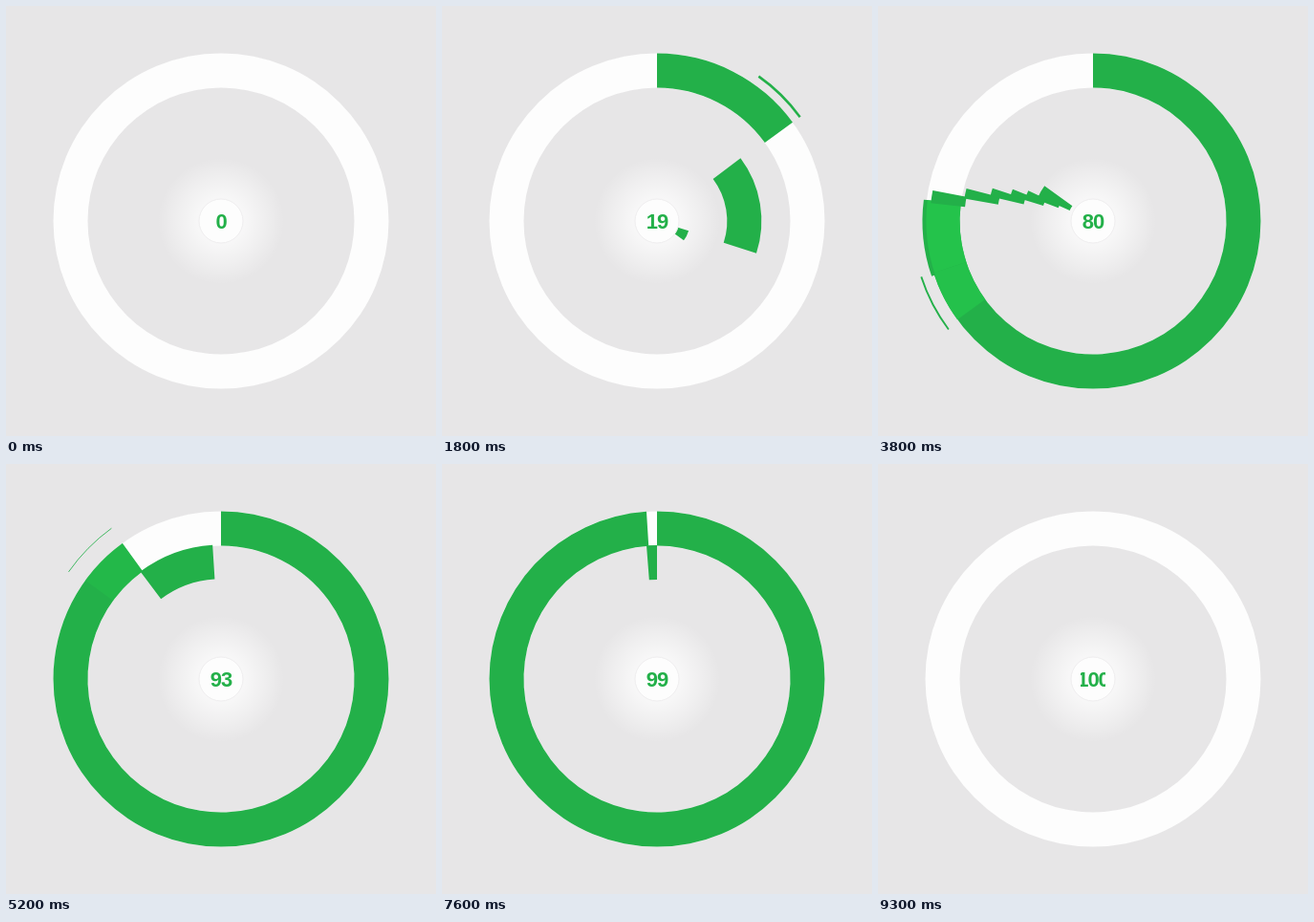
These frames come from a looping animation (450x450 px, 9.4 s). An HTML page with a canvas:

```html
<!DOCTYPE html>
<html lang="en">
<head>
<meta charset="utf-8">
<title>Radial progress</title>
<style>
  html, body { margin: 0; width: 100%; height: 100%; overflow: hidden; background: #e7e6e7; }
  canvas { display: block; width: 450px; height: 450px; }
</style>
</head>
<body>
<canvas id="stage" width="450" height="450"></canvas>
<script>
const ctx = document.getElementById('stage').getContext('2d');
const LOOP = 9400, STEP = 100;
const FLIGHT = 1000, RIPPLE = 600, FINALE = 1300;
const C = 225, OUTER = 175.5, THICK = 36, HUB = 23, START = 16;
const OVERLAP = 0.25, FLASH_FROM = 65;
const GREEN = '#23b049', LIGHT = '#24c34b', WHITE = '#fdfdfd';

// Progress arrives in bursts: each piece spans two neighbouring stops,
// and the gap between launches shrinks by a constant ratio.
function burst(launch, stops, gap = 0, ratio = 1) {
  return stops.slice(1).map((to, i) => {
    const piece = { from: stops[i], to, launch, land: launch + FLIGHT };
    launch += gap;
    gap *= ratio;
    return piece;
  });
}

const pieces = [
  ...burst(75, [0, 10, 15, 30, 35], 500, 0.92),
  ...burst(1620, [35, 65]),
  ...burst(2476, [65, 70, 77], 310),
  ...burst(2815, [77, 78, 79, 80, 81, 82, 85], 115, 0.87),
  ...burst(3726, [85, 90, 99], 590),
  ...burst(6718, [99, 100])
];
const finish = pieces[pieces.length - 1].land;

const clamp = x => Math.max(0, Math.min(1, x));
const angle = percent => (percent / 100 - 0.25) * Math.PI * 2;
const travel = (piece, t) => clamp((t - piece.launch) / FLIGHT) ** 2;

// Landed pieces count in full, flying ones in part.
function countAt(t) {
  const total = pieces.reduce((sum, p) => {
    const size = p.to - p.from;
    return sum + (t >= p.land ? size : 0.92 * size ** 0.7 * travel(p, t));
  }, 0);
  return Math.floor(total);
}

function band(from, to, outer, color) {
  ctx.fillStyle = color;
  ctx.beginPath();
  ctx.arc(C, C, outer, angle(from), angle(to));
  ctx.arc(C, C, Math.max(0, outer - THICK), angle(to), angle(from), true);
  ctx.fill();
}

function line(from, to, radius, width) {
  ctx.strokeStyle = GREEN;
  ctx.lineWidth = width;
  ctx.beginPath();
  ctx.arc(C, C, radius, angle(from), angle(to));
  ctx.stroke();
}

function drawBackground() {
  ctx.fillStyle = '#e7e6e7';
  ctx.fillRect(0, 0, 450, 450);
  const glow = ctx.createRadialGradient(C, C, HUB, C, C, 66);
  glow.addColorStop(0, 'rgba(255,255,255,.7)');
  glow.addColorStop(0.5, 'rgba(255,255,255,.37)');
  glow.addColorStop(1, 'rgba(255,255,255,0)');
  ctx.fillStyle = glow;
  ctx.fillRect(C - 66, C - 66, 132, 132);
  band(0, 100, OUTER, WHITE);
}

function drawPieces(t) {
  const filled = Math.max(0, ...pieces.filter(p => t >= p.land).map(p => p.to));
  if (filled) {
    ctx.globalAlpha = 1 - clamp((t - 8900) / 300);
    band(0, filled, OUTER, GREEN);
    ctx.globalAlpha = 1;
  }
  for (const piece of pieces) {
    const { from, to, launch, land } = piece;
    if (t < launch) continue;
    if (t < land) {
      band(from - OVERLAP, to, START + (OUTER - START) * travel(piece, t), GREEN);
      continue;
    }
    const p = (t - land) / RIPPLE;
    if (p >= 1 || to === 100) continue;
    if (from >= FLASH_FROM) {
      ctx.globalAlpha = Math.min(1, 2 - 2 * p);
      band(from, to, OUTER, LIGHT);
      ctx.globalAlpha = 1;
    }
    line(from - OVERLAP, to, 176 + 24 * p, 4 * (1 - p));
  }
}

function drawFinale(t) {
  const p = (t - finish) / FINALE;
  if (p < 0 || p >= 1) return;
  const e = 1 - 2 ** (-10 * p);
  ctx.globalAlpha = clamp((1 - p) / 0.4);
  line(0, 100, 176 + 45.6 * e, 4 - 3.1 * e);
  ctx.globalAlpha = 1;
}

function drawHub(t) {
  ctx.fillStyle = WHITE;
  ctx.strokeStyle = '#efeeef';
  ctx.lineWidth = 1;
  ctx.beginPath();
  ctx.arc(C, C, HUB, 0, Math.PI * 2);
  ctx.fill();
  ctx.stroke();

  // The label is masked from both sides just before the loop restarts.
  ctx.save();
  const width = 44 - 0.18 * Math.max(0, t - 9200);
  ctx.beginPath();
  ctx.rect(C - width / 2, C - HUB, width, HUB * 2);
  ctx.clip();
  ctx.font = '700 22px "Liberation Sans", Arial, sans-serif';
  ctx.letterSpacing = '-1px';
  ctx.textAlign = 'center';
  ctx.textBaseline = 'alphabetic';
  ctx.fillStyle = GREEN;
  ctx.fillText(countAt(t), C, 233);
  ctx.restore();
}

function frame(now) {
  const t = Math.floor((now % LOOP) / STEP) * STEP;
  drawBackground();
  drawPieces(t);
  drawFinale(t);
  drawHub(t);
  requestAnimationFrame(frame);
}
requestAnimationFrame(frame);
</script>
</body>
</html>
```
